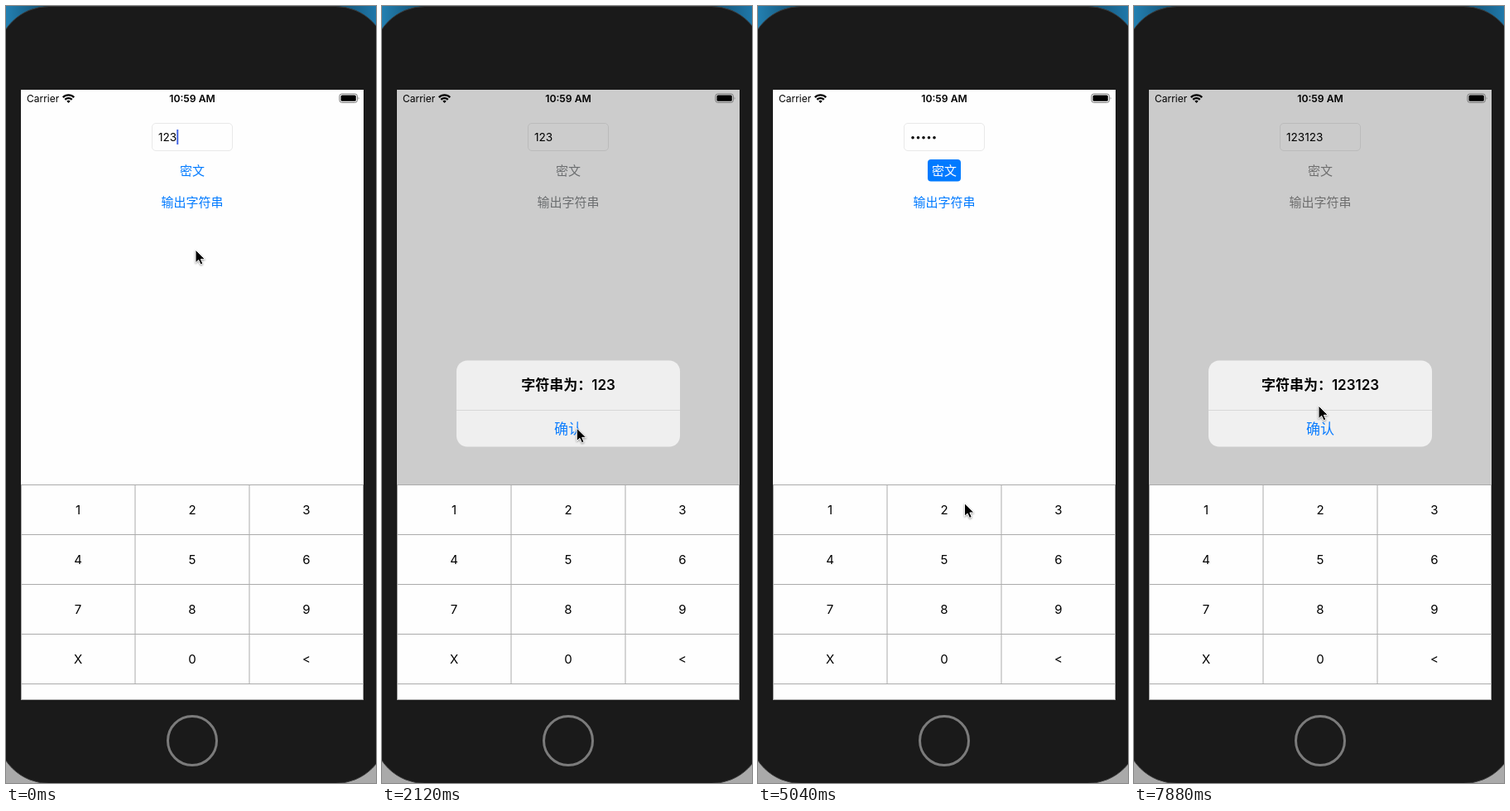
An HTML page that plays this animation: 447x937 px, repeating every 8000 ms.

```html
<!DOCTYPE html>
<html lang="zh-CN">
<head>
<meta charset="utf-8">
<style>
  html, body { margin: 0; width: 100%; height: 100%; overflow: hidden; background: #aaa; }
  svg { display: block; font-family: Inter, "Noto Sans CJK SC", "Noto Sans CJK", sans-serif; }
  .mid { text-anchor: middle; }
  .bold { font-weight: 600; }
</style>
</head>
<body>
<svg width="447" height="937" viewBox="0 0 447 937">
  <defs>
    <linearGradient id="sky"><stop stop-color="#2380b2"/><stop offset=".12" stop-color="#124a68"/><stop offset=".88" stop-color="#124a68"/><stop offset="1" stop-color="#1f78aa"/></linearGradient>
    <clipPath id="screen"><rect x="18" y="101" width="414" height="736"/></clipPath>
  </defs>
  <rect width="447" height="400" fill="url(#sky)"/>
  <rect x="-11" y=".5" width="472" height="937" rx="63" fill="#1a1a1a" stroke="#3a3a3a"/>
  <circle cx="225" cy="886" r="29.5" fill="none" stroke="#7b7b7b" stroke-width="3"/>

  <g clip-path="url(#screen)">
    <rect x="18" y="101" width="414" height="736" fill="#fefefe"/>
    <rect x="176.5" y="141.5" width="97" height="33" rx="4.5" fill="none" stroke="#e9e9e9"/>
    <text id="digits" x="184" y="163" font-size="13.6"></text>
    <path id="dots" stroke="#000" stroke-width="3.6" stroke-linecap="round" stroke-dasharray="0 6.5"/>
    <rect id="caret" y="149" width="2" height="18" fill="#4466e4"/>
    <rect id="pill" x="205" y="185" width="40" height="26.5" rx="4" fill="#007aff"/>
    <g class="mid" font-size="15">
      <text id="secret" x="225" y="203.7">密文</text>
      <text id="output" x="225" y="241.7">输出字符串</text>
    </g>
    <rect id="dim" x="18" y="101" width="414" height="736"/>

    <g id="alert" class="mid">
      <rect x="90" y="427.5" width="270" height="104" rx="13" fill="#f0f0f0"/>
      <path d="M90 487.5H360" stroke="#d8d8d8"/>
      <text id="title" class="bold" x="225" y="463" font-size="17"></text>
      <text x="225" y="516" font-size="17" fill="#0a7cff">确认</text>
    </g>

    <g id="pad" class="mid" font-size="15">
      <rect x="18" y="577" width="414" height="260" fill="#fefefe"/>
      <path d="M18 577.5H432M18 637.5H432M18 697.5H432M18 757.5H432M18 817.5H432M18.5 577V837M156 577V817M294 577V817M431.5 577V837M18 836.5H432" fill="none" stroke="#ababab"/>
    </g>

    <text x="25" y="116" font-size="12">Carrier</text>
    <text class="mid bold" x="225" y="116" font-size="12.2">10:59 AM</text>
    <g fill="none" stroke="#000" stroke-width="2.3">
      <path d="M68.8 110.1a9.4 9.4 0 0 1 13.4 0M71.3 112.9a5.9 5.9 0 0 1 8.4 0"/>
      <path d="M75.5 117l-2.2-2.3a3.2 3.2 0 0 1 4.4 0z" fill="#000" stroke="none"/>
    </g>
    <rect x="402.9" y="106" width="21.5" height="10.4" rx="2.8" fill="none" stroke="#777"/>
    <rect x="404.5" y="107.6" width="18.3" height="7.2" rx="1.5"/>
    <path d="M425.7 109.5q1.8 1.7 0 3.6z" fill="#777"/>
  </g>
  <path id="cursor" d="M0 0V15.6L3.6 12.3 6.1 17.8 8.8 16.6 6.4 11.3H11.4Z" stroke="#fff" style="filter:drop-shadow(0 1px 1px #0006)"/>
</svg>
<script>
const $ = id => document.getElementById(id);
const set = (id, attrs) => { for (const k in attrs) $(id).setAttribute(k, attrs[k]); };
const clamp = v => Math.min(1, Math.max(0, v));

[..."123456789X0<"].forEach((key, i) => {
  const label = document.createElementNS("http://www.w3.org/2000/svg", "text");
  label.textContent = key;
  label.setAttribute("x", 87 + i % 3 * 138);
  label.setAttribute("y", 612.5 + Math.floor(i / 3) * 60);
  $("pad").append(label);
});

// Critically damped spring from 0 to 1
const spring = ms => {
  const x = Math.max(0, ms) * .02285;
  return 1 - (1 + x) * Math.exp(-x);
};

const ALERTS = [1236, 7153], DISMISS = 2112;
const SECURE_ON = 3000, SECURE_OFF = 6060;
const KEY_TIMES = [4200, 4850, 5380];

// time, x, y
const PATH = [
  [120, 229, 294], [230, 236, 294], [400, 236, 294], [900, 229, 232], [1220, 229, 232],
  [1420, 282, 370], [1880, 236, 509], [2250, 235, 509], [2820, 227, 203], [3060, 227, 203],
  [3520, 205, 603], [3760, 168, 565], [4060, 85, 601], [4300, 85, 601], [4750, 223, 601],
  [4940, 223, 601], [5300, 361, 594], [5440, 361, 594], [5960, 227, 202], [6400, 227, 202],
  [6800, 228, 232], [7340, 228, 232], [7660, 226, 440], [7770, 226, 454], [7880, 223, 482]
];

function cursorAt(t) {
  const i = PATH.findIndex(p => p[0] > t);
  if (i <= 0) return PATH[i ? PATH.length - 1 : 0].slice(1);
  const [a, b] = [PATH[i - 1], PATH[i]];
  const u = (t - a[0]) / (b[0] - a[0]), e = u * u * (3 - 2 * u);
  return [1, 2].map(k => a[k] + (b[k] - a[k]) * e);
}

// The pad starts to leave on the tap, then comes back with the alert
function padDrop(ms) {
  if (ms < -10) return 260 * spring(ms + 130);
  return 260 * spring(120) * (1 - clamp((ms + 10) / 185)) ** 1.15;
}

function draw(t) {
  const start = t < 4000 ? ALERTS[0] : ALERTS[1];
  const since = t - start;
  const shown = spring(since);
  const closing = t < 4000 ? spring(t - DISMISS) : 0;
  const level = shown * (1 - closing);

  const typed = KEY_TIMES.filter(k => t >= k).length;
  const text = "123" + "123".slice(0, typed);
  const secure = t >= SECURE_ON && t < SECURE_OFF;
  const n = text.length;
  $("digits").textContent = secure ? "" : text;
  set("dots", { d: secure ? `M187 158.7h${6.5 * (n - 1) + .1}` : "" });

  const blink = t < 1106 ? t < 180 || t > 600
    : t > 2150 && t < 7023 && (t - 2150) % 1000 < 550;
  set("caret", { x: secure ? 185 + 6.5 * n : 183 + 7.75 * n, opacity: +blink });

  const mix = (a, b) => Math.round(a + (b - a) * level);
  const tint = `rgb(${mix(0, 136)},${mix(122, 136)},${mix(255, 136)})`;
  const selected = t < SECURE_ON ? 0 : 1 - clamp((t - SECURE_OFF - 20) / 120);
  set("pill", { opacity: selected });
  set("secret", { fill: selected > .5 ? "#fff" : tint });
  const released = since + 130;
  set("output", { fill: tint, opacity: released < -60 ? 1 : .25 + .75 * clamp(released / 380) });

  set("dim", { opacity: .2 * level });
  $("title").textContent = "字符串为：" + text;
  const scale = 1.2 - .2 * shown;
  set("alert", { opacity: level, transform: `translate(225 479.5) scale(${scale}) translate(-225 -479.5)` });
  set("pad", { transform: `translate(0 ${padDrop(since)})` });
  set("cursor", { transform: `translate(${cursorAt(t)})` });
}

const begin = performance.now();
function tick() {
  draw((performance.now() - begin) % 8000);
  requestAnimationFrame(tick);
}
tick();
</script>
</body>
</html>
```
